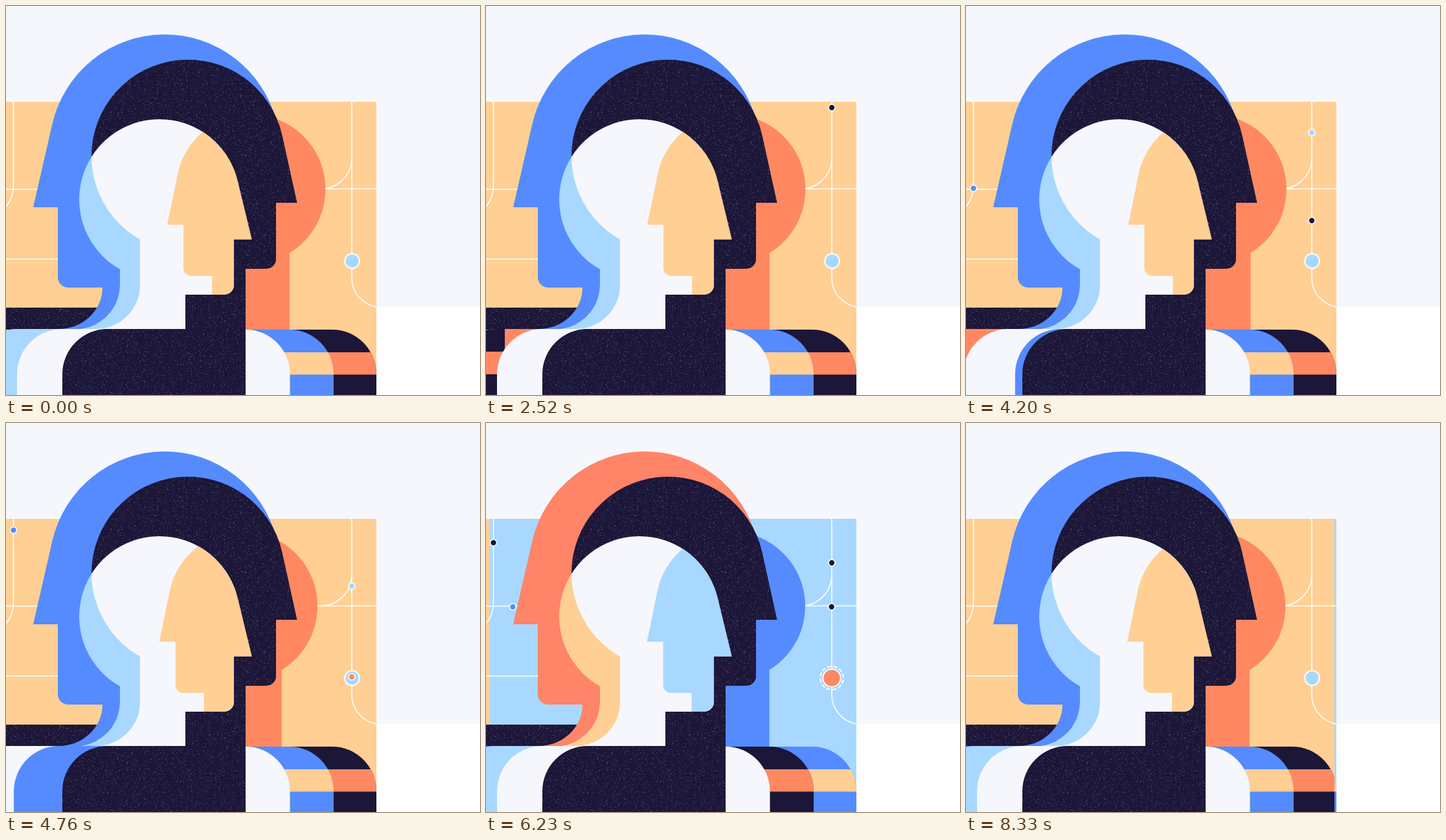
Animation, 732 px wide and 601 px high, one loop 8.4 s. Source, as an HTML page with a canvas:

```html
<!DOCTYPE html>
<html lang="en">
<head>
<meta charset="utf-8">
<title>Layered profiles</title>
<style>
html, body { margin: 0; width: 100%; height: 100%; overflow: hidden; background: #fff; }
canvas { display: block; }
</style>
</head>
<body>
<canvas id="stage" width="732" height="601"></canvas>
<script>
const LOOP = 8400, STEP = 70, W = 732, H = 601, SPEED = .101;
const ctx = document.getElementById('stage').getContext('2d');

const pale = '#f6f7fc', navy = '#1c1638', blue = '#558bff', sky = '#a8d8ff',
      sand = '#ffcf94', coral = '#ff8861';
const warm = { bg: sand, hair: blue, collar: sky, back: coral,
               arms: [blue, navy], stripes: [sand, coral] };
const cool = { bg: sky, hair: '#ff8468', collar: sand, back: blue,
               arms: [navy, blue], stripes: [coral, sand] };

const hair = new Path2D('M42 311L71.5 182.3A178 178 0 0 1 417.5 178L281 232L176 400V431' +
  'A68 68 0 0 1 108 499H81A68 64 0 0 0 149 435H96A16 16 0 0 1 80 419V311Z');
const nape = new Path2D('M113 299A124 124 0 0 1 361 299A124 124 0 0 1 113 299Z' +
  'M176 360H207V499H108A68 68 0 0 0 176 431Z');
const dark = new Path2D('M132 232A149 149 0 0 1 426.5 199.8L449.5 304H417V391' +
  'A15 15 0 0 1 402 406H370V500H277V440Z');
const face = new Path2D('M139 499A68 68 0 0 0 207 431V360.8A149 149 0 0 1 132 233' +
  'A124 124 0 0 1 357.5 269.7L379.5 360.5H352V431A15 15 0 0 1 337 446H277V499Z');
const figure = new Path2D('M249 338L265.2 259.3A115.3 115.3 0 1 1 438 381.4V500H318V417H286' +
  'A12 12 0 0 1 274 405V338Z');
const body = new Path2D('M87 601V569A70 70 0 0 1 157 499H370V601Z');
const band = new Path2D('M0 601V569A70 70 0 0 1 70 499H300V601Z');
const tracks = new Path2D('M11.5 148V278Q11 297 0 310M0 283H60M0 391H90' +
  'M534 148V418A46 46 0 0 0 572 465M480 282.5H486A48 48 0 0 0 534 235M480 282.5H572');

// Dots that drop down a column, then turn towards the head: [start, x, direction, color]
const drops = [
  [612, 534, -1, blue], [3730, 534, -1, sky], [4880, 534, -1, navy], [5557, 534, -1, navy],
  [2877, 11.5, 1, blue], [4587, 11.5, 1, blue], [5864, 11.5, 1, navy]
];

const clamp = v => Math.max(0, Math.min(1, v));
const part = (t, a, b) => clamp((t - a) / (b - a));
const ease = p => (1 - Math.cos(Math.PI * p)) / 2;
const glide = (t, start) => t < start ? 0 : (1 - Math.exp((start - t) / 247)) ** 2;

const grain = document.createElement('canvas');
grain.width = W; grain.height = H;
{
  const g = grain.getContext('2d');
  let seed = 7;
  const rnd = () => (seed = seed * 16807 % 2147483647) / 2147483647;
  for (let i = 0; i < 40000; i++) {
    g.fillStyle = `rgba(225,225,245,${rnd() * .34})`;
    g.fillRect(Math.floor(rnd() * W), Math.floor(rnd() * H), 1, 1);
  }
}

function fill(path, color) {
  ctx.fillStyle = color;
  ctx.fill(path);
}
function rect(x, y, w, h, color) {
  ctx.fillStyle = color;
  ctx.fillRect(x, y, w, h);
}
function clipped(path, draw) {
  ctx.save();
  ctx.clip(path);
  draw();
  ctx.restore();
}
function shifted(x, draw) {
  ctx.save();
  ctx.translate(x, 0);
  draw();
  ctx.restore();
}
function grainy(path) {
  fill(path, navy);
  clipped(path, () => ctx.drawImage(grain, 0, 0));
}
function box(x, y, w, h) {
  const p = new Path2D();
  p.rect(x, y, w, h);
  return p;
}
function dot(x, y, r, color, line = 1.6) {
  ctx.beginPath();
  ctx.arc(x, y, r, 0, 7);
  ctx.fillStyle = color;
  ctx.fill();
  ctx.strokeStyle = '#fff';
  ctx.lineWidth = line;
  ctx.stroke();
}

function hub(t, p) {
  if (p === warm) return dot(534.5, 394, 11.3, sky, 2);
  dot(534, 394, 13.5, coral, 2);
  ctx.save();
  ctx.translate(534, 394);
  ctx.rotate(t / 900);
  ctx.setLineDash([6.3, 3.1]);
  ctx.beginPath();
  ctx.arc(0, 0, 18, 0, 7);
  ctx.stroke();
  ctx.restore();
}

function travellers(t) {
  for (const [start, x, dir, color] of drops) {
    const run = (t - start) * SPEED, turn = Math.max(0, run - 136);
    if (run > -8 && turn < 70) dot(x + dir * turn, 148 + Math.min(run, 136), 5, color);
  }
  // One drop falls straight into the hub and lights it up.
  if (t > 2340 && t < 6500) {
    const y = Math.min(394, 148 + (t - 2431) * SPEED + 9 * part(t, 3570, 4760));
    dot(534, y, 5 + 8.5 * ease(part(t, 4800, 5060)), y > 383 ? coral : navy);
  }
}

function leftShoulder(t, p) {
  const slide = 230 * ease(part(t, 3700, 6250));
  const bands = [[-53, sky], [17, pale], [97, p.hair], [177, sky], [247, pale]];
  bands.forEach(([home, color], i) => {
    const x = home - slide;
    shifted(x, () => fill(band, color));
    if (i) return;
    const sweep = (a, b, y, h, c) => {
      const edge = 90 * (1 - part(t, a, b));
      if (t > a) rect(edge - x, y, 120, h, c);
    };
    shifted(x, () => clipped(band, () => {
      sweep(500, 1100, 499, 102, navy);
      sweep(500, 1100, 534, 35, coral);
      sweep(2100, 2720, 499, 102, coral);
    }));
  });
}

function rightShoulder(p) {
  const arm = edge => new Path2D(
    `M370 601V500H${edge - 68}A68 69 0 0 1 ${edge} 569V601Z`);
  [[572, 1], [506, 0]].forEach(([edge, i]) => {
    const shape = arm(edge);
    fill(shape, p.arms[i]);
    clipped(shape, () => rect(370, 535, 210, 34.5, p.stripes[i]));
  });
  fill(arm(438.5), pale);
}

function scene(t, p) {
  const sway = 16 * ease(part(t, 2520, 3500)) - 29 * ease(part(t, 3500, 4900)) +
               13 * ease(part(t, 4900, 6400));
  rect(0, 0, W, H, '#fff');
  rect(0, 0, W, 465, pale);
  clipped(box(0, 148, 572, 453), () => {
    rect(0, 148, 572, 453, p.bg);
    ctx.strokeStyle = '#fff';
    ctx.lineWidth = 1.6;
    ctx.stroke(tracks);
    hub(t, p);
    travellers(t);
  });
  shifted(sway, () => fill(figure, p.back));
  rightShoulder(p);
  grainy(box(0, 466, 140, 34));
  fill(hair, p.hair);
  fill(nape, p.collar);
  grainy(dark);
  fill(face, pale);
  clipped(face, () => shifted(sway, () => fill(figure, p.bg)));
  clipped(box(0, 499, 200, 102), () => leftShoulder(t, p));
  grainy(body);
}

function draw(now) {
  const t = Math.floor((now % LOOP) / STEP) * STEP;
  scene(t, warm);
  // The cool palette slides in from the right and later withdraws.
  const edge = Math.round(572 * (1 - glide(t, 4930) + glide(t, 6820)));
  if (edge < 572) clipped(box(edge, 0, 572 - edge, H), () => scene(t, cool));
}

const begin = performance.now();
function loop() {
  draw(performance.now() - begin);
  requestAnimationFrame(loop);
}
loop();
</script>
</body>
</html>
```
